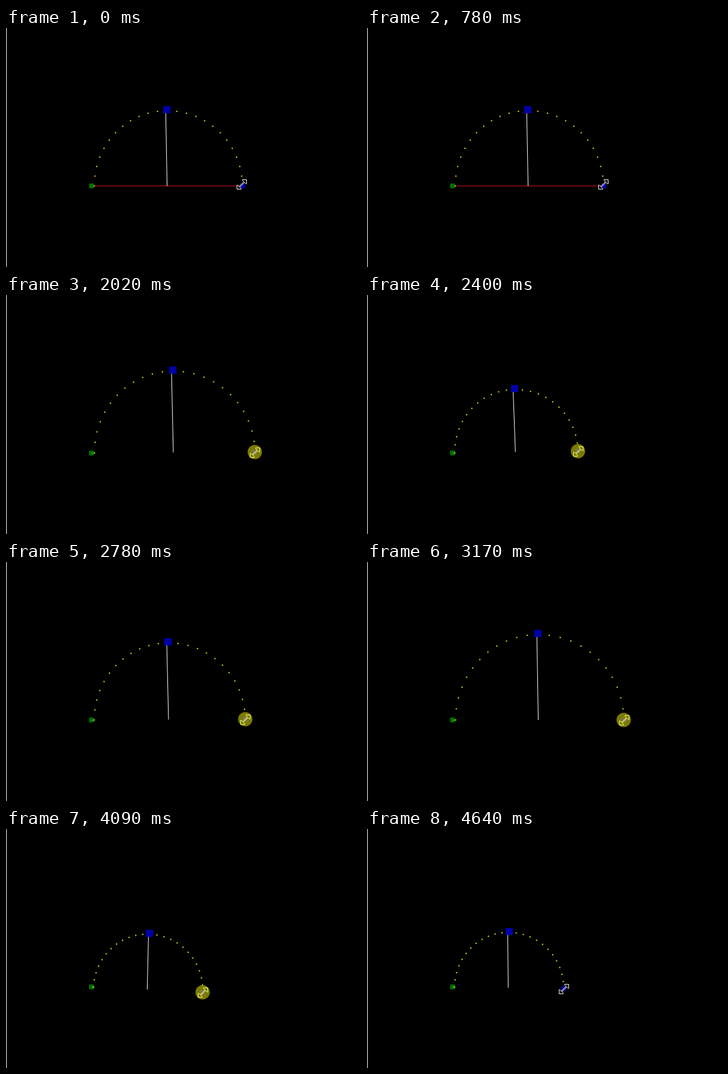
These frames come from a looping animation (594x401 px, 5250 ms). An HTML page with a canvas:

```html
<!DOCTYPE html>
<html>
<head>
<meta charset="utf-8">
<style>
  html, body { margin: 0; width: 100%; height: 100%; overflow: hidden; background: #000; }
  canvas { display: block; }
</style>
</head>
<body>
<canvas id="stage" width="594" height="401"></canvas>
<script>
const ctx = document.getElementById('stage').getContext('2d');
const LOOP = 5250, STEP = 76.6, PRESS = 1020, RELEASE = 4640;
const anchor = { x: 143, y: 265 };

const linear = k => k;
const easeIn = k => k ** 1.3;
const easeOut = k => 1 - (1 - k) ** 1.8;
const smooth = k => k * k * (3 - 2 * k);

// Mouse moves: start time, number of steps, end x, end y, easing
const moves = [
  [780, 2, 396, 262, linear],
  [1020, 7, 420, 264, easeIn],
  [1560, 2, 432, 264, linear],
  [1940, 7, 353, 262, smooth],
  [2550, 7, 431, 265, smooth],
  [3170, 1, 429.5, 265, linear],
  [3245, 6, 351, 275, easeIn],
  [3710, 4, 329, 275, easeOut],
  [4090, 4, 329, 268, smooth]
];

function mouseAt(t) {
  let x = 394, y = 262;
  for (const [start, steps, toX, toY, ease] of moves) {
    if (t < start) break;
    const done = Math.min(steps, Math.floor((t - start + 4) / STEP) + 1);
    const k = ease(done / steps);
    x += (toX - x) * k;
    y += (toY - y) * k;
  }
  return { x, y };
}

function square(x, y, size, color) {
  ctx.fillStyle = color;
  ctx.fillRect(Math.round(x - size / 2), Math.round(y - size / 2), size, size);
}

function line(x1, y1, x2, y2, color) {
  ctx.strokeStyle = color;
  ctx.lineWidth = 1;
  ctx.beginPath();
  ctx.moveTo(x1, y1);
  ctx.lineTo(x2, y2);
  ctx.stroke();
}

function drawArc(end) {
  const mx = (anchor.x + end.x) / 2, my = (anchor.y + end.y) / 2;
  const ux = end.x - mx, uy = end.y - my;
  const topX = mx + uy, topY = my - ux;
  line(mx + 0.3, my, topX - 2, topY + 2, '#fff');

  ctx.fillStyle = '#c4c818';
  for (let i = 0; i < 24; i++) {
    const a = i * Math.PI / 24, s = Math.sin(a);
    const c = -Math.cos(a) * (i < 12 ? 0.963 : 1);
    const x = mx + ux * c + uy * s, y = my + uy * c - ux * s;
    ctx.fillRect(x - 1.1, y - 1.1, 2.2, 2.2);
  }
  square(topX, topY - 1.5, 12, '#0000aa');
}

function drawCursor({ x, y }) {
  const half = [[8, -8], [8, -1], [7, -1], [4.5, -3.5], [-3.5, 4.5], [-1, 7], [-1, 8]];
  const cx = Math.round(x) + 0.5, cy = Math.round(y) + 0.5;
  ctx.beginPath();
  for (const sign of [1, -1])
    for (const [dx, dy] of half) ctx.lineTo(cx + sign * dx, cy + sign * dy);
  ctx.closePath();
  ctx.fillStyle = '#000';
  ctx.fill();
  ctx.strokeStyle = '#fff';
  ctx.lineWidth = 1;
  ctx.stroke();
}

function draw(t) {
  const mouse = mouseAt(t);
  const moved = t >= PRESS;
  const end = moved ? mouse : { x: 395.5, y: 265 };

  ctx.fillStyle = '#000';
  ctx.fillRect(0, 0, 594, 401);
  ctx.fillStyle = '#fff';
  ctx.fillRect(0, 0, 1, 401);

  if (!moved) line(143, 265, 396, 265, '#e0141c');
  square(anchor.x, anchor.y, 8, '#006c00');
  if (moved) line(143, 265.5, 148, 265.5, '#20c020');
  square(end.x, end.y, 8, '#0000aa');
  drawArc(end);
  drawCursor(mouse);

  if (moved && t < RELEASE) {
    ctx.fillStyle = 'rgba(255, 255, 0, 0.48)';
    ctx.beginPath();
    ctx.arc(mouse.x, mouse.y, 12, 0, Math.PI * 2);
    ctx.fill();
  }
}

const begin = performance.now();
function tick() {
  draw((performance.now() - begin) % LOOP);
  requestAnimationFrame(tick);
}
tick();
</script>
</body>
</html>
```
